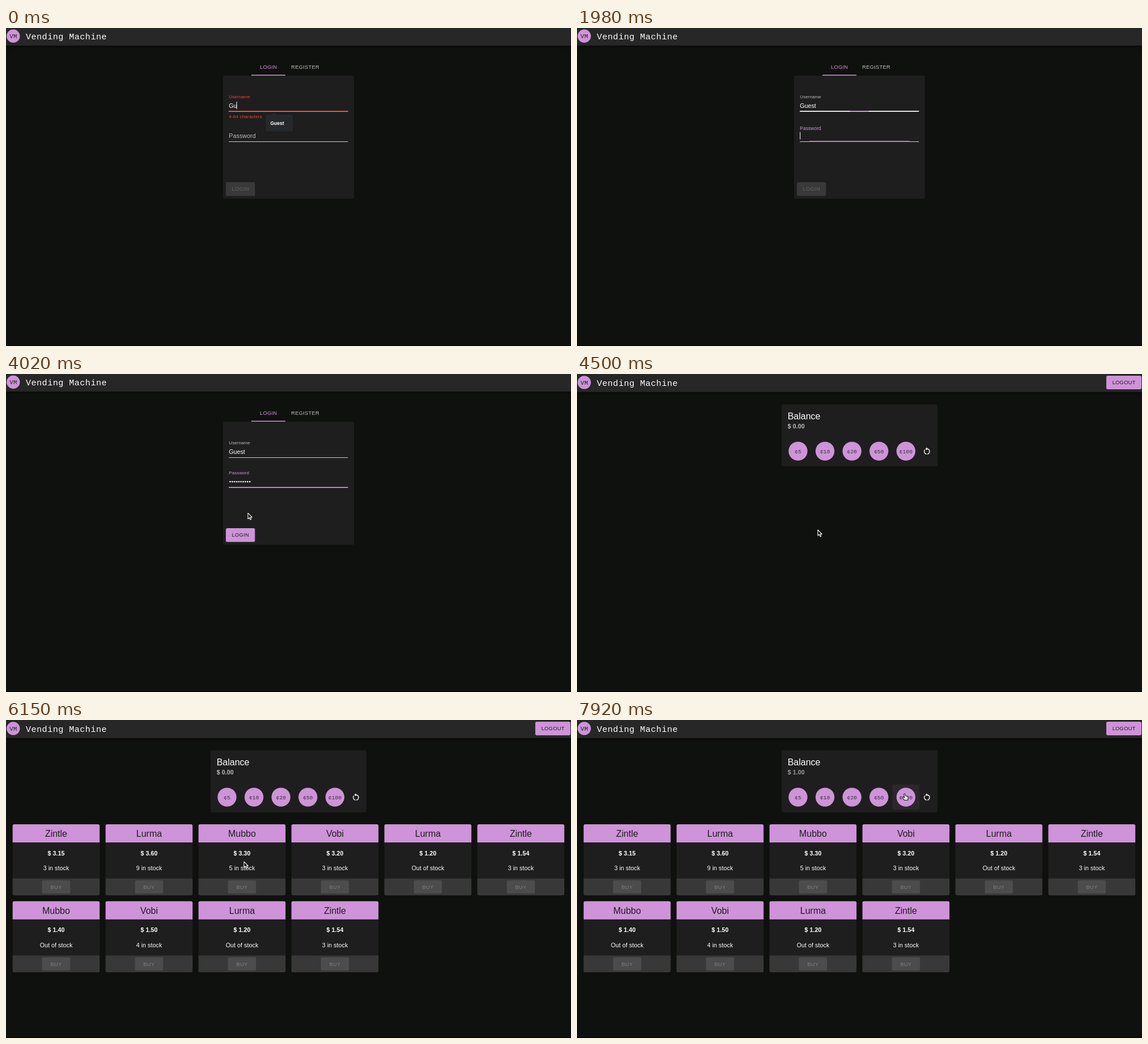
An HTML page with a canvas that plays this animation: 997x561 px, repeating every 8000 ms.

```html
<!DOCTYPE html>
<html lang="en">
<head>
<meta charset="utf-8">
<title>Vending Machine</title>
<style>
html, body { margin: 0; width: 100%; height: 100%; overflow: hidden; background: #0f110e; }
canvas { display: block; }
</style>
</head>
<body>
<canvas id="stage" width="997" height="561"></canvas>
<script>
const ctx = document.getElementById('stage').getContext('2d');
const LOOP = 8000;
const SANS = '"Liberation Sans", Arial, sans-serif';
const MONO = '"Liberation Mono", "Courier New", monospace';
const PURPLE = [206, 147, 216], DEEP = [171, 71, 188], RED = [244, 67, 54];
const GREY = [187, 187, 187], OFF = [57, 57, 57], OFF_TEXT = [98, 98, 98], INK = [36, 28, 38];
const CARD = '#1e1e1e', WHITE = '#fff';

const USER = 'Guest';
const USER_KEYS = [1500, 1590, 1710];
const PASS_KEYS = [2340, 2430, 2610, 2700, 2790, 3030, 3060, 3210, 3300, 3390];
const TAB = 1880, VALID = 1590, MOUSE = 3750, SIGNED_IN = 4290, LOADED = 4530, PAID = 7620;
const COINS = [5, 10, 20, 50, 100];
const PRODUCTS = [
  ['Zintle', 3.15, 3], ['Lurma', 3.6, 9], ['Mubbo', 3.3, 5], ['Vobi', 3.2, 3], ['Lurma', 1.2, 0],
  ['Zintle', 1.54, 3], ['Mubbo', 1.4, 0], ['Vobi', 1.5, 4], ['Lurma', 1.2, 0], ['Zintle', 1.54, 3],
];
// time, x, y of the pointer
const PATH = [
  [3750, 474, 142], [3870, 448, 200], [4020, 427, 245], [4140, 420, 281], [4290, 421, 282],
  [4500, 425, 275], [5400, 425, 275], [5430, 614, 317], [5550, 864, 300], [5700, 790, 500],
  [5820, 500, 551], [5970, 116, 420], [6060, 210, 242], [6150, 420, 250], [6340, 420, 250],
  [6600, 470, 190], [6870, 546, 118], [7140, 565, 130], [7440, 578, 130], [8000, 578, 130],
];

const clamp = v => Math.max(0, Math.min(1, v));
const lerp = (a, b, p) => a + (b - a) * p;
const span = (t, start, length) => clamp((t - start) / length);
const rgb = c => `rgb(${c.map(Math.round)})`;
const mix = (a, b, p) => rgb(a.map((v, i) => lerp(v, b[i], p)));
const smooth = p => p * p * (3 - 2 * p);

// cubic-bezier(0, 0, .2, 1)
function easeOut(x) {
  let lo = 0, hi = 1;
  for (let i = 0; i < 20; i++) {
    const s = (lo + hi) / 2;
    if (.6 * (1 - s) * s * s + s ** 3 < x) lo = s; else hi = s;
  }
  return 3 * (1 - lo) * lo * lo + lo ** 3;
}

function box(x, y, w, h, fill, radius = 0) {
  ctx.fillStyle = fill;
  ctx.beginPath();
  ctx.roundRect(x, y, w, h, radius);
  ctx.fill();
}

function disc(x, y, r, fill) {
  ctx.fillStyle = fill;
  ctx.beginPath();
  ctx.arc(x, y, r, 0, 7);
  ctx.fill();
}

// y is the middle of the capitals
function text(str, x, y, size, fill, { align = 'left', font = SANS, weight = 400, gap = 0 } = {}) {
  ctx.font = `${weight} ${size}px ${font}`;
  ctx.letterSpacing = gap + 'px';
  ctx.textAlign = align;
  ctx.fillStyle = fill;
  ctx.fillText(str, align === 'center' ? x + gap / 2 : x, y + size * .355);
}

const caps = (str, x, y, fill) => text(str, x, y, 9.33, fill, { align: 'center', gap: .27 });

function button(label, x, y, w, h, fill, ink) {
  box(x, y, w, h, fill, 2.67);
  caps(label, x + w / 2, y + h / 2, ink);
}

function header(t) {
  const shift = t < SIGNED_IN ? 0 : .7;
  ctx.save();
  ctx.shadowColor = 'rgba(0,0,0,.5)';
  ctx.shadowBlur = 6;
  ctx.shadowOffsetY = 2;
  box(0, 0, 997, 31 + shift, '#272727');
  ctx.restore();
  disc(12.8, 14.2 + shift, 11.7, rgb(PURPLE));
  text('VM', 12.8, 14.4 + shift, 10.6, rgb(INK), { align: 'center', font: MONO, gap: .2 });
  text('Vending Machine', 35, 14.6 + shift, 15.2, WHITE, { font: MONO, gap: .42 });
  if (shift) button('LOGOUT', 934, 3, 62, 24, rgb(PURPLE), rgb(INK));
}

// underline that grows from its middle
function underline(y, amount, fill) {
  box(393.3 + 105 * (1 - amount), y, 210 * amount, 1.8, fill);
}

function caret(t, x, y, lastKey) {
  if ((t - lastKey) % 1000 < 500) box(x, y - 6.5, 1, 13, WHITE);
}

function loginPage(t) {
  caps('LOGIN', 463, 68.3, rgb(PURPLE));
  caps('REGISTER', 528, 68.3, rgb(GREY));
  box(383, 84, 231, 217, CARD, 2);
  box(433, 82.4, 60, 1.6, rgb(PURPLE));

  const focus = easeOut(span(t, TAB, 200));
  const valid = t >= VALID;
  const name = USER.slice(0, 2 + USER_KEYS.filter(k => t >= k).length);

  const nameLabel = t < TAB ? mix(RED, PURPLE, span(t, VALID, 200)) : mix(PURPLE, GREY, focus);
  text('Username', 393.3, 121, 8, nameLabel, { gap: .08 });
  text(name, 393.3, 136.8, 10.67, WHITE);
  if (t < 1320) box(406.5, 130, 1, 13, WHITE);
  else if (t >= 1500 && t < TAB) caret(t, 393.3 + ctx.measureText(name).width, 136.5, 1500);
  box(393.3, 146, 210, t < MOUSE ? 1.8 : 0, WHITE);
  if (t >= MOUSE) box(393.3, 147, 210, 1, '#c8c8c8');
  if (focus < 1) underline(146, 1 - focus, rgb(valid ? PURPLE : RED));
  if (!valid) text('4-64 characters', 393.3, 156.2, 8, rgb(RED), { gap: .2 });

  text('Password', 393.3, lerp(190.3, 174.2, focus), lerp(10.67, 8, focus), mix(GREY, PURPLE, focus), { gap: .08 });
  box(393.3, 200, 210, 1, '#d0d0d0');
  if (focus > 0) underline(199.3, focus, rgb(PURPLE));

  const typed = PASS_KEYS.filter(k => t >= k);
  typed.forEach((_, i) => disc(395.5 + 3.85 * i, 190, 1.35, WHITE));
  if (t >= TAB) caret(t, 393.3 + 3.85 * typed.length, 190, typed.at(-1) ?? TAB);

  if (t < 1710) {
    box(459, 153, 47, 29.5, '#26292b', 2.5);
    ctx.beginPath();
    ctx.moveTo(468, 153.5);
    ctx.lineTo(473, 149);
    ctx.lineTo(478, 153.5);
    ctx.fill();
    text(USER, 466.5, 168.2, 8.5, WHITE, { weight: 700 });
  }

  const enabled = smooth(span(t, 3210, 250));
  const hover = smooth(span(t, 4110, 250));
  const fill = hover ? mix(PURPLE, DEEP, hover) : mix(OFF, PURPLE, enabled);
  button('LOGIN', 388, 272, 51.3, 24.3, fill, mix(OFF_TEXT, INK, enabled));
}

function balance(t) {
  box(361, 53.5, 275, 109.5, CARD, 2.67);
  text('Balance', 371.7, 74.6, 16, WHITE);
  const paid = t >= PAID;
  text(paid ? '$ 1.00' : '$ 0.00', 371.7, 91.8, 10.67, paid ? '#9a9a9a' : '#bdbdbd', { weight: 700, gap: .05 });

  const hover = smooth(span(t, 6960, 180)) * .05;
  const ripple = easeOut(span(t, 7590, 400));
  ctx.save();
  ctx.beginPath();
  ctx.roundRect(556.7, 113.7, 47.6, 44.6, 2.67);
  ctx.clip();
  box(556, 113, 50, 46, `rgba(206,147,216,${hover})`);
  if (ripple) disc(578, 132, 42 * ripple, 'rgba(206,147,216,.025)');
  ctx.restore();

  COINS.forEach((coin, i) => {
    const x = 390 + 47.6 * i;
    disc(x, 136.1, 16.7, rgb(PURPLE));
    text('¢' + coin, x, 136.2, 9.33, '#3b2b3e', { align: 'center', font: MONO, gap: .27 });
  });

  ctx.save();
  ctx.translate(609.5, 128);
  ctx.scale(2 / 3, 2 / 3);
  ctx.fillStyle = WHITE;
  ctx.fill(RESTART);
  ctx.restore();
}

const RESTART = new Path2D('M12 5V2L8 6l4 4V7c3.31 0 6 2.69 6 6 0 2.97-2.17 5.43-5 5.91v2.02c3.95-.49 7-3.85 7-7.93 0-4.42-3.58-8-8-8z' +
  'm-6 8c0-1.65.67-3.15 1.76-4.24L6.34 7.34C4.9 8.79 4 10.79 4 13c0 4.08 3.05 7.44 7 7.93v-2.02c-2.83-.48-5-2.94-5-5.91z');
const ARROW = new Path2D('M0 0V10.2L2.4 8L4.1 11.8L5.8 11L4.2 7.4H7.3Z');
const HAND = new Path2D('M-1.2 .6Q0 -.6 1 .8L1.8 4L4.6 4.4Q6.3 5 6.2 7L5.6 11.4H-.4L-3.6 6.8Q-3.6 5.4-2 6L-.2 7.2Z');

function product([name, price, stock], i) {
  const x = 11.7 + 164 * (i % 6), y = 184 + 135.7 * Math.floor(i / 6), w = 153.5, mid = x + w / 2;
  box(x, y, w, 125.2, CARD, 2.67);
  box(x, y, w, 32, rgb(PURPLE), [2.67, 2.67, 0, 0]);
  box(x, y + 95.7, w, 29.5, '#383838', [0, 0, 2.67, 2.67]);
  text(name, mid, y + 16.4, 16, '#211a23', { align: 'center' });
  text('$ ' + price.toFixed(2), mid, y + 50.8, 10.67, WHITE, { align: 'center', weight: 700, gap: .1 });
  text(stock ? stock + ' in stock' : 'Out of stock', mid, y + 77.3, 10.67, WHITE, { align: 'center', gap: .06 });
  button('BUY', mid - 24.8, y + 98.7, 49.6, 23.6, '#4c4c4c', '#7f7f7f');
}

function pointer(t) {
  if (t < MOUSE) return;
  const i = PATH.findIndex(p => p[0] > t);
  const [t0, x0, y0] = PATH[i - 1], [t1, x1, y1] = PATH[i];
  const p = (t - t0) / (t1 - t0);
  const overLogin = t > 4110 && t < SIGNED_IN;
  const shape = overLogin || t >= 6840 ? HAND : ARROW;
  ctx.save();
  ctx.translate(lerp(x0, x1, p), lerp(y0, y1, p));
  ctx.lineWidth = 1.1;
  ctx.lineJoin = 'round';
  ctx.fillStyle = shape === HAND ? WHITE : '#000';
  ctx.strokeStyle = shape === HAND ? '#222' : WHITE;
  ctx.fill(shape);
  ctx.stroke(shape);
  ctx.restore();
}

function draw(now) {
  const t = now % LOOP;
  box(0, 0, 997, 561, '#0f110e');
  header(t);
  if (t < SIGNED_IN) loginPage(t);
  else balance(t);
  if (t >= LOADED) PRODUCTS.forEach(product);
  pointer(t);
  box(0, 560, 997, 1, '#000');
}

const start = performance.now();
function tick() {
  draw(performance.now() - start);
  requestAnimationFrame(tick);
}
tick();
</script>
</body>
</html>
```
